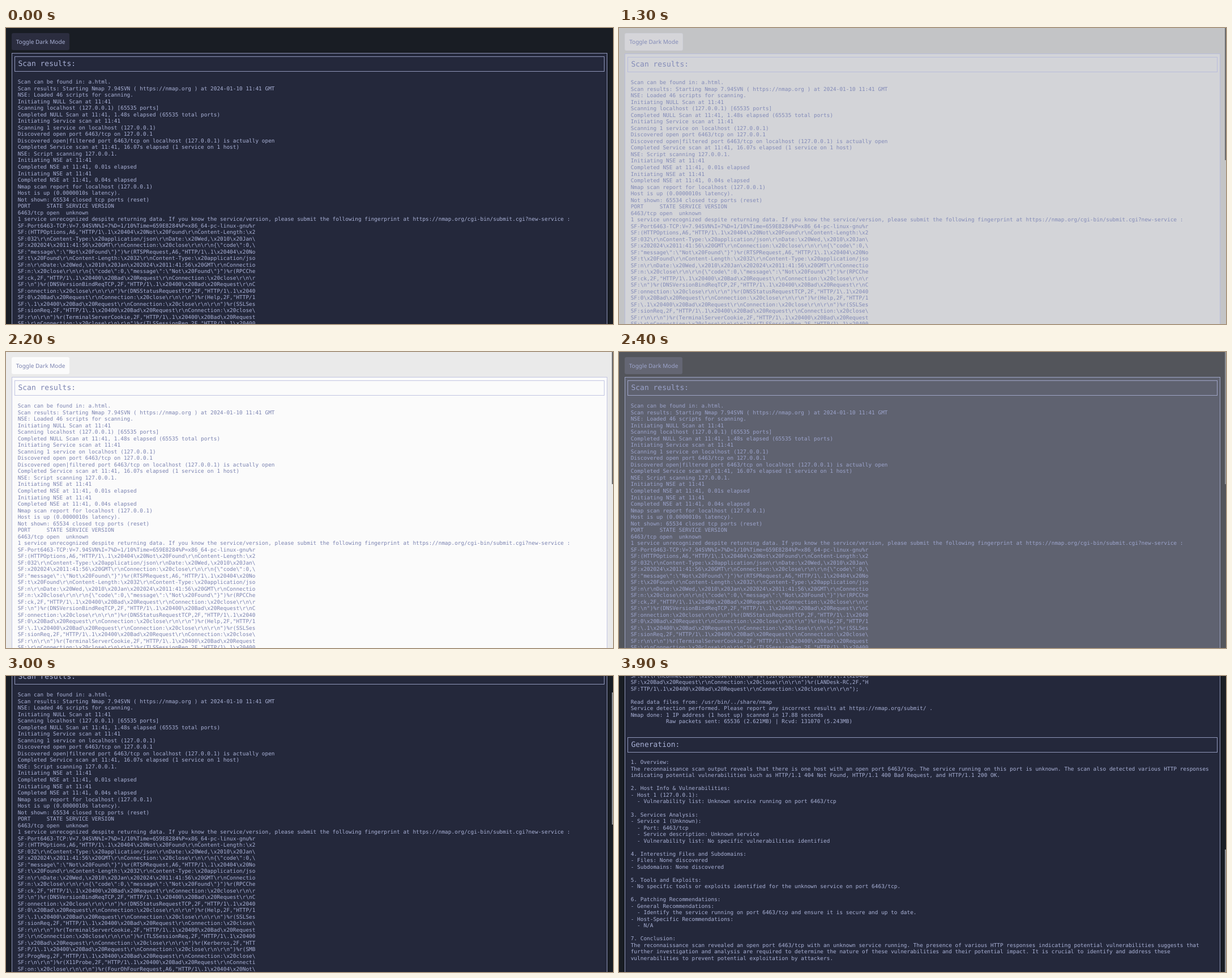
An HTML page for the animation above (4.8 s loop, 1072x522 px).

```html
<!DOCTYPE html>
<html lang="en">
<head>
<meta charset="utf-8">
<title>Scan results</title>
<style>
  :root {
    --mix: 0%;
    --page: color-mix(in srgb, #191d24, #eeeeee var(--mix));
    --panel: color-mix(in srgb, #24283b, #ffffff var(--mix));
    --button: color-mix(in srgb, #2b2d3f, #ffffff var(--mix));
    --line: color-mix(in srgb, #9097ba, #c3c6e3 var(--mix));
    --ink: color-mix(in srgb, #a9b1d6, #7a82b0 var(--mix));
  }
  html, body { margin: 0; width: 100%; height: 100%; overflow: hidden; }
  body { position: relative; background: var(--page); color: var(--ink); text-rendering: geometricPrecision; }
  #content, #content * { position: absolute; box-sizing: border-box; margin: 0; }
  #content { left: 0; top: 0; width: 1072px; height: 1300px; }
  #toggle {
    left: 10px; top: 8.5px; width: 102px; height: 30px; border-radius: 3px;
    background: var(--button); border: 1px solid transparent;
    font: 10.1px/28px "Noto Sans", sans-serif; text-align: center; white-space: nowrap;
  }
  #panel { left: 10px; top: 44px; width: 1052px; height: 1200px; background: var(--panel); border: 1px solid var(--line); }
  #sheet { left: 0; top: 0; width: 1072px; height: 1300px; }
  h2 {
    left: 15px; width: 1042px; height: 27px; padding-left: 5.5px; border: 1px solid var(--line);
    font: 12.97px/25.5px "DejaVu Sans Mono", monospace; white-space: pre;
  }
  pre { left: 20.7px; font: 9.435px/11.52px "DejaVu Sans Mono", monospace; white-space: pre; }
  #thumb { position: absolute; right: 0; top: 0; width: 2px; height: 233px; }
</style>
</head>
<body>
<div id="content">
<div id="toggle">Toggle Dark Mode</div>
<div id="sheet">
<div id="panel"></div>
<h2 style="top:50px">Scan results:</h2>
<pre style="top:90.3px">
Scan can be found in: a.html.
Scan results: Starting Nmap 7.94SVN ( https://nmap.org ) at 2024-01-10 11:41 GMT
NSE: Loaded 46 scripts for scanning.
Initiating NULL Scan at 11:41
Scanning localhost (127.0.0.1) [65535 ports]
Completed NULL Scan at 11:41, 1.48s elapsed (65535 total ports)
Initiating Service scan at 11:41
Scanning 1 service on localhost (127.0.0.1)
Discovered open port 6463/tcp on 127.0.0.1
Discovered open|filtered port 6463/tcp on localhost (127.0.0.1) is actually open
Completed Service scan at 11:41, 16.07s elapsed (1 service on 1 host)
NSE: Script scanning 127.0.0.1.
Initiating NSE at 11:41
Completed NSE at 11:41, 0.01s elapsed
Initiating NSE at 11:41
Completed NSE at 11:41, 0.04s elapsed
Nmap scan report for localhost (127.0.0.1)
Host is up (0.0000010s latency).
Not shown: 65534 closed tcp ports (reset)
PORT     STATE SERVICE VERSION
6463/tcp open  unknown
1 service unrecognized despite returning data. If you know the service/version, please submit the following fingerprint at https://nmap.org/cgi-bin/submit.cgi?new-service :
SF-Port6463-TCP:V=7.94SVN%I=7%D=1/10%Time=659E8284%P=x86_64-pc-linux-gnu%r
SF:(HTTPOptions,A6,"HTTP/1\.1\x20404\x20Not\x20Found\r\nContent-Length:\x2
SF:032\r\nContent-Type:\x20application/json\r\nDate:\x20Wed,\x2010\x20Jan\
SF:x202024\x2011:41:56\x20GMT\r\nConnection:\x20close\r\n\r\n{\"code\":0,\
SF:"message\":\"Not\x20Found\"}")%r(RTSPRequest,A6,"HTTP/1\.1\x20404\x20No
SF:t\x20Found\r\nContent-Length:\x2032\r\nContent-Type:\x20application/jso
SF:n\r\nDate:\x20Wed,\x2010\x20Jan\x202024\x2011:41:56\x20GMT\r\nConnectio
SF:n:\x20close\r\n\r\n{\"code\":0,\"message\":\"Not\x20Found\"}")%r(RPCChe
SF:ck,2F,"HTTP/1\.1\x20400\x20Bad\x20Request\r\nConnection:\x20close\r\n\r
SF:\n")%r(DNSVersionBindReqTCP,2F,"HTTP/1\.1\x20400\x20Bad\x20Request\r\nC
SF:onnection:\x20close\r\n\r\n")%r(DNSStatusRequestTCP,2F,"HTTP/1\.1\x2040
SF:0\x20Bad\x20Request\r\nConnection:\x20close\r\n\r\n")%r(Help,2F,"HTTP/1
SF:\.1\x20400\x20Bad\x20Request\r\nConnection:\x20close\r\n\r\n")%r(SSLSes
SF:sionReq,2F,"HTTP/1\.1\x20400\x20Bad\x20Request\r\nConnection:\x20close\
SF:r\n\r\n")%r(TerminalServerCookie,2F,"HTTP/1\.1\x20400\x20Bad\x20Request
SF:\r\nConnection:\x20close\r\n\r\n")%r(TLSSessionReq,2F,"HTTP/1\.1\x20400
SF:\x20Bad\x20Request\r\nConnection:\x20close\r\n\r\n")%r(Kerberos,2F,"HTT
SF:P/1\.1\x20400\x20Bad\x20Request\r\nConnection:\x20close\r\n\r\n")%r(SMB
SF:ProgNeg,2F,"HTTP/1\.1\x20400\x20Bad\x20Request\r\nConnection:\x20close\
SF:r\n\r\n")%r(X11Probe,2F,"HTTP/1\.1\x20400\x20Bad\x20Request\r\nConnecti
SF:on:\x20close\r\n\r\n")%r(FourOhFourRequest,A6,"HTTP/1\.1\x20404\x20Not\
SF:x20Found\r\nContent-Length:\x2032\r\nContent-Type:\x20application/json\
SF:r\nDate:\x20Wed,\x2010\x20Jan\x202024\x2011:41:56\x20GMT\r\nConnection:
SF:\x20close\r\n\r\n{\"code\":0,\"message\":\"Not\x20Found\"}")%r(LPDStrin
SF:g,2F,"HTTP/1\.1\x20400\x20Bad\x20Request\r\nConnection:\x20close\r\n\r\
SF:n")%r(LDAPSearchReq,2F,"HTTP/1\.1\x20400\x20Bad\x20Request\r\nConnectio
SF:n:\x20close\r\n\r\n")%r(LDAPBindReq,2F,"HTTP/1\.1\x20400\x20Bad\x20Requ
SF:est\r\nConnection:\x20close\r\n\r\n")%r(SIPOptions,2F,"HTTP/1\.1\x20400
SF:\x20Bad\x20Request\r\nConnection:\x20close\r\n\r\n")%r(LANDesk-RC,2F,"H
SF:TTP/1\.1\x20400\x20Bad\x20Request\r\nConnection:\x20close\r\n\r\n");

Read data files from: /usr/bin/../share/nmap
Service detection performed. Please report any incorrect results at https://nmap.org/submit/ .
Nmap done: 1 IP address (1 host up) scanned in 17.88 seconds
           Raw packets sent: 65536 (2.621MB) | Rcvd: 131070 (5.243MB)
</pre>
<h2 style="top:768px">Generation:</h2>
<pre style="top:807.4px">
1. Overview:
The reconnaissance scan output reveals that there is one host with an open port 6463/tcp. The service running on this port is unknown. The scan also detected various HTTP responses
indicating potential vulnerabilities such as HTTP/1.1 404 Not Found, HTTP/1.1 400 Bad Request, and HTTP/1.1 200 OK.

2. Host Info &amp; Vulnerabilities:
- Host 1 (127.0.0.1):
  - Vulnerability list: Unknown service running on port 6463/tcp

3. Services Analysis:
- Service 1 (Unknown):
  - Port: 6463/tcp
  - Service description: Unknown service
  - Vulnerability list: No specific vulnerabilities identified

4. Interesting Files and Subdomains:
- Files: None discovered
- Subdomains: None discovered

5. Tools and Exploits:
- No specific tools or exploits identified for the unknown service on port 6463/tcp.

6. Patching Recommendations:
- General Recommendations:
  - Identify the service running on port 6463/tcp and ensure it is secure and up to date.
- Host-Specific Recommendations:
  - N/A

7. Conclusion:
The reconnaissance scan revealed an open port 6463/tcp with an unknown service running. The presence of various HTTP responses indicating potential vulnerabilities suggests that
further investigation and analysis are required to determine the nature of these vulnerabilities and their potential impact. It is crucial to identify and address these
vulnerabilities to prevent potential exploitation by attackers.
</pre>
</div>
</div>
<div id="thumb"></div>
<script>
  const LOOP = 4800;
  const THUMB_RATIO = 0.4637;
  // time in ms, share of the light theme in %, scroll in px, opacity of the button's border
  const STEPS = [
    [0, 0, 0, 0],
    [1100, 10, 0, 0.8], [1200, 51, 0, 0.4], [1300, 80, 0, 0.12], [1400, 94, 0, 0.03], [1500, 100, 0, 0],
    [2200, 98, 0, 0], [2300, 64, 0, 0], [2400, 27, 0, 0], [2500, 9, 0, 0], [2600, 2.5, 0, 0],
    [3000, 0, 62, 0], [3200, 0, 152, 0], [3300, 0, 240, 0], [3400, 0, 326, 0], [3500, 0, 404, 0],
    [3600, 0, 478, 0], [3700, 0, 546, 0], [3800, 0, 606, 0], [3900, 0, 660, 0],
  ];
  const byId = id => document.getElementById(id);
  const content = byId('content'), sheet = byId('sheet'), toggle = byId('toggle'), thumb = byId('thumb');
  let shown;

  function show(step) {
    const [time, mix, scroll, border] = step;
    const grow = border > 0 ? 1 : 0;
    document.documentElement.style.setProperty('--mix', mix + '%');
    content.style.top = -scroll + 'px';
    sheet.style.top = grow + 'px';
    toggle.style.width = 102 + grow + 'px';
    toggle.style.height = 30 + grow + 'px';
    toggle.style.lineHeight = 28 + grow + 'px';
    toggle.style.borderColor = `rgba(169, 177, 214, ${border})`;
    thumb.style.top = scroll * THUMB_RATIO + 'px';
    thumb.style.visibility = time ? 'visible' : 'hidden';
    thumb.style.background = mix > 40 ? '#6a6a6c' : '#8f9196';
  }

  function tick() {
    const time = performance.now() % LOOP;
    const step = STEPS.findLast(([start]) => start <= time);
    if (step !== shown) show(shown = step);
    requestAnimationFrame(tick);
  }
  tick();
</script>
</body>
</html>
```
